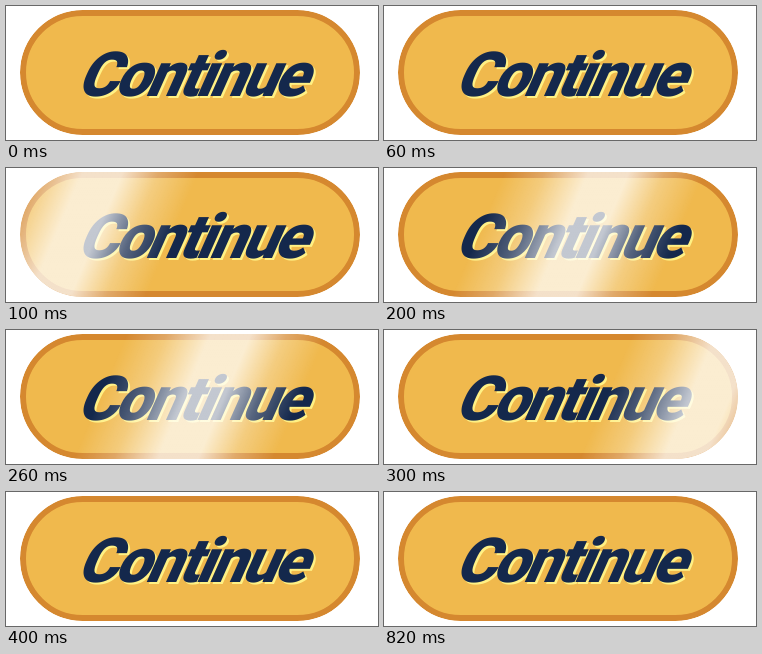
Write an HTML page that moves like this. It is 372 px wide and 134 px high and loops after 1100 ms.

```html
<!DOCTYPE html>
<html lang="en">
<head>
<meta charset="utf-8">
<title>Continue button</title>
<style>
  html, body { margin: 0; width: 100%; height: 100%; overflow: hidden; background: #fff; }
  svg { display: block; width: 372px; height: 134px; }
  .label {
    font: 900 62px Roboto, "Open Sans", sans-serif;
    letter-spacing: -3.2px;
    text-anchor: middle;
  }
  .glow { fill: #fff184; }
  .ink { fill: #14284c; }
  .shine { animation: sweep 1100ms step-end infinite; }
  @keyframes sweep {
    0% { transform: translateX(-130px); }
    9.09% { transform: translateX(66px); }
    18.18% { transform: translateX(194px); }
    27.27% { transform: translateX(322px); }
    36.36%, 100% { transform: translateX(500px); }
  }
</style>
</head>
<body>
<svg viewBox="0 0 372 134">
  <defs>
    <clipPath id="pill"><rect x="14" y="4" width="340" height="125" rx="62.5"/></clipPath>
    <linearGradient id="sheen">
      <stop offset="0" stop-color="#fff" stop-opacity="0"/>
      <stop offset=".2" stop-color="#fff" stop-opacity=".26"/>
      <stop offset=".42" stop-color="#fff" stop-opacity=".74"/>
      <stop offset=".62" stop-color="#fff" stop-opacity=".74"/>
      <stop offset=".8" stop-color="#fff" stop-opacity=".28"/>
      <stop offset="1" stop-color="#fff" stop-opacity="0"/>
    </linearGradient>
  </defs>
  <g clip-path="url(#pill)">
    <rect x="17" y="7" width="334" height="119" rx="59.5" fill="#f0b94d" stroke="#d5882f" stroke-width="6"/>
    <g class="label">
      <text class="glow" transform="translate(184.5 91.5) skewX(-24)">Continue</text>
      <text class="ink" transform="translate(182.5 89.5) skewX(-24)">Continue</text>
    </g>
    <g class="shine">
      <rect x="-100" y="-67" width="200" height="134" fill="url(#sheen)" transform="translate(0 67) skewX(-23)"/>
    </g>
  </g>
</svg>
</body>
</html>
```
